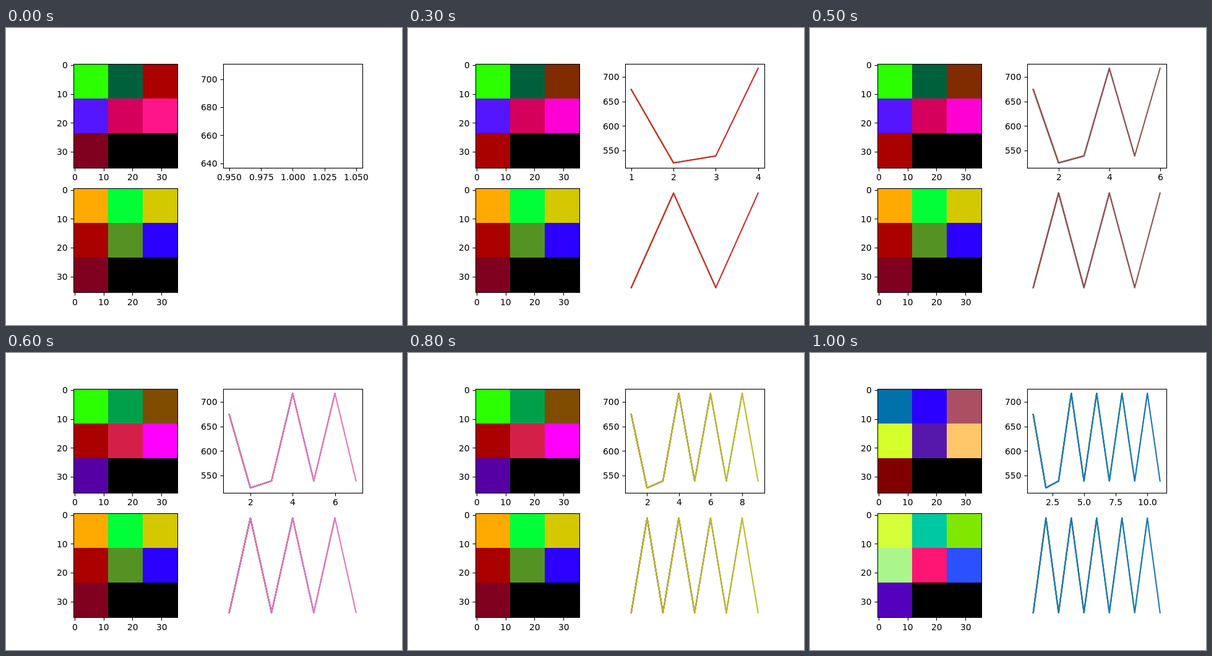
Animation of 640x480 px, one loop 1.1 s. Source, as an HTML page with a canvas:

```html
<!DOCTYPE html>
<html lang="en">
<head>
<meta charset="utf-8">
<title>Colour grids and score plots</title>
<style>
html, body { margin: 0; width: 100%; height: 100%; overflow: hidden; background: #fff; }
canvas { display: block; width: 640px; height: 480px; }
</style>
</head>
<body>
<canvas id="stage" width="640" height="480"></canvas>
<script>
const ctx = document.getElementById('stage').getContext('2d');

const STEP = 100, COUNT = 11;
const PT = 100 / 72;
const PAD = 7 * PT;

const CYCLE = ['#1f77b4', '#ff7f0e', '#2ca02c', '#d62728', '#9467bd',
  '#8c564b', '#e377c2', '#7f7f7f', '#bcbd22', '#17becf'];

// Seven cells per grid, the last two stay black
const TOP = {
  start: '2bff00 00603c aa0000 5515ff d4005c ff158a 80001f',
  odd: '2bff00 00603c 802b00 5515ff d4005c ff00d4 aa0000',
  even: '2bff00 00a04b 804d00 aa0000 d42049 ff00ff 5500a4',
  end: '0071aa 2b00ff aa5062 d4ff2b 5518aa ffc66a 800000'
};
const BOTTOM = {
  base: 'ffaa00 00ff36 d4c800 aa0000 559224 2b00ff 80001f',
  late: '55ff00 00ff00 d44628 aa0000 ff1e46 2b00ff 800012',
  end: 'd4ff39 00c8a0 80e800 aaf68a ff1573 2b50ff 5500bc'
};

const score = i => i < 3 ? [674, 525, 539][i] : i % 2 ? 717 : 539;
const flip = i => i % 2;

const gridBox = y => ({ x: 108.73, y, w: 168, h: 168 });
const plotBox = y => ({ x: 350.55, y, w: 225.45, h: 168 });
const snap = v => Math.floor(v + 0.5) + 0.5;

// Axis limits with a 5% margin; a single value is widened first
function limits(lo, hi) {
  if (lo === hi) { const d = lo * 0.05; lo -= d; hi += d; }
  const m = (hi - lo) * 0.05;
  return [lo - m, hi + m];
}

function ticks([lo, hi], bins) {
  const raw = (hi - lo) / bins;
  const mag = 10 ** Math.floor(Math.log10(raw));
  const step = mag * [1, 2, 2.5, 5, 10].find(s => s * mag >= raw - 1e-9);
  let digits = 0;
  while (Math.abs(step * 10 ** digits - Math.round(step * 10 ** digits)) > 1e-6) digits++;
  const out = [];
  for (let n = Math.ceil(lo / step - 1e-9); n * step <= hi + 1e-9; n++)
    out.push({ v: n * step, label: (n * step).toFixed(digits) });
  return out;
}

function stroke(x1, y1, x2, y2) {
  ctx.beginPath();
  ctx.moveTo(x1, y1);
  ctx.lineTo(x2, y2);
  ctx.stroke();
}

function label(text, x, y, align) {
  const left = x - ctx.measureText(text).width * align;
  ctx.fillText(text, Math.round(left + 0.5), Math.round(y));
}

function axes(box, xTicks, yTicks, toX, toY) {
  ctx.strokeStyle = ctx.fillStyle = '#000';
  ctx.lineWidth = 0.8 * PT;
  ctx.lineCap = 'butt';
  ctx.lineJoin = 'miter';
  const l = snap(box.x), t = snap(box.y);
  const r = snap(box.x + box.w), b = snap(box.y + box.h);
  ctx.strokeRect(l, t, r - l, b - t);
  for (const k of xTicks) {
    const x = toX(k.v);
    stroke(snap(x), b, snap(x), b + 5);
    label(k.label, x, box.y + box.h + PAD + 10.8, 0.5);
  }
  for (const k of yTicks) {
    const y = toY(k.v);
    stroke(l - 5, snap(y), l, snap(y));
    label(k.label, box.x - PAD, y + 5.3, 1);
  }
}

function grid(y, colours) {
  const box = gridBox(y);
  const x0 = Math.round(box.x), y0 = Math.round(y);
  ctx.fillStyle = '#000';
  ctx.fillRect(x0, y0, 168, 168);
  colours.split(' ').forEach((c, i) => {
    ctx.fillStyle = '#' + c;
    ctx.fillRect(x0 + i % 3 * 56, y0 + Math.floor(i / 3) * 56, 56, 56);
  });
  const marks = [0, 10, 20, 30].map(v => ({ v, label: String(v) }));
  const pos = v => (v + 0.5) * 168 / 36;
  axes(box, marks, marks, v => box.x + pos(v), v => box.y + pos(v));
}

function plot(y, n, value, framed) {
  const box = plotBox(y);
  const vals = Array.from({ length: n }, (_, i) => value(i));
  const xl = limits(1, n);
  const yl = limits(Math.min(...vals), Math.max(...vals));
  const toX = v => box.x + (v - xl[0]) / (xl[1] - xl[0]) * box.w;
  const toY = v => box.y + (yl[1] - v) / (yl[1] - yl[0]) * box.h;

  // Every step adds a longer line on top of the earlier ones
  ctx.lineWidth = 1.5 * PT;
  ctx.lineCap = 'square';
  ctx.lineJoin = 'round';
  for (let k = 2; k <= n; k++) {
    ctx.strokeStyle = CYCLE[(k - 1) % 10];
    ctx.beginPath();
    for (let i = 0; i < k; i++) ctx.lineTo(toX(i + 1), toY(vals[i]));
    ctx.stroke();
  }
  if (framed) axes(box, ticks(xl, 5), ticks(yl, 6), toX, toY);
}

function draw(step) {
  ctx.fillStyle = '#fff';
  ctx.fillRect(0, 0, 640, 480);
  ctx.font = 10 * PT + 'px "DejaVu Sans", sans-serif';
  ctx.textBaseline = 'alphabetic';
  const last = step === COUNT - 1;
  const top = step === 0 ? 'start' : last ? 'end' : step % 2 ? 'odd' : 'even';
  const bottom = last ? 'end' : step === COUNT - 2 ? 'late' : 'base';
  grid(57.6, TOP[top]);
  grid(259.2, BOTTOM[bottom]);
  plot(57.6, step + 1, score, true);
  if (step > 0) plot(259.2, step + 1, flip, false);
}

const begin = performance.now();
function tick() {
  const t = Math.max(0, performance.now() - begin);
  draw(Math.floor(t / STEP) % COUNT);
  requestAnimationFrame(tick);
}
tick();
</script>
</body>
</html>
```
